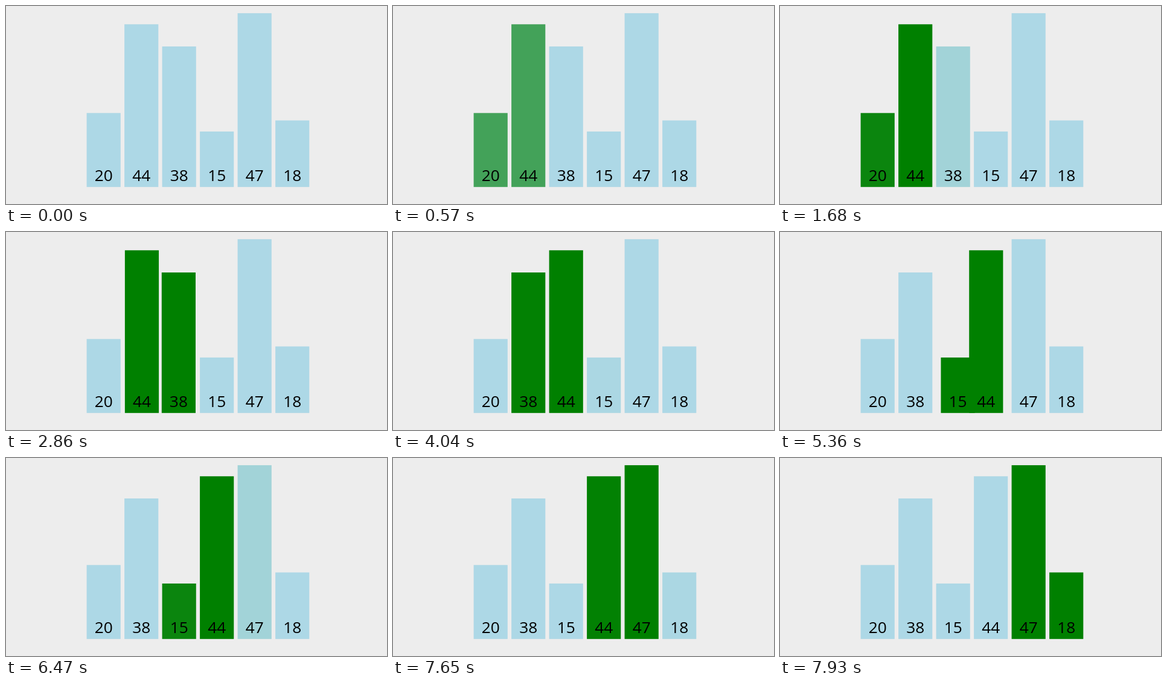
An HTML page for the animation above (8 s loop, 631 px wide and 328 px high).

```html
<!DOCTYPE html>
<html lang="en">
<head>
<meta charset="utf-8">
<title>Bubble sort</title>
<style>
  html, body { margin: 0; width: 100%; height: 100%; overflow: hidden; background: #ededed; }
  svg { display: block; width: 631px; height: 328px; }
  text { font: 26.3px "Open Sans", "Noto Sans", sans-serif; text-anchor: middle; }
</style>
</head>
<body>
<svg id="stage" viewBox="0 0 631 328"></svg>
<script>
const LOOP = 8000, TICK = 70, FADE = 250;
const LEFT = 133.6, PITCH = 62.5, WIDTH = 56.2, BASE = 299.8, UNIT = 6.125;
const BLUE = [173, 216, 230], GREEN = [0, 128, 0];
const values = [20, 44, 38, 15, 47, 18];

// at: first visible change; lead: time already eased by then;
// order: bar indices from left to right; lit: highlighted bars
const states = [
  { at: 0,    lead: FADE, order: '012345', lit: '' },
  { at: 500,  lead: 19, order: '012345', lit: '01' },
  { at: 1680, lead: 19, order: '012345', lit: '12' },
  { at: 2860, lead: 6,  order: '021345', lit: '12' },
  { at: 4040, lead: 6,  order: '021345', lit: '13' },
  { at: 5220, lead: 6,  order: '023145', lit: '13' },
  { at: 6470, lead: 19, order: '023145', lit: '14' },
  { at: 7650, lead: 6,  order: '023145', lit: '45' }
];

const stage = document.getElementById('stage');

function add(parent, tag, attrs) {
  const el = document.createElementNS('http://www.w3.org/2000/svg', tag);
  for (const key in attrs) el.setAttribute(key, attrs[key]);
  return parent.appendChild(el);
}

const bars = values.map(value => {
  const group = add(stage, 'g');
  const height = value * UNIT;
  const rect = add(group, 'rect', { y: BASE - height, width: WIDTH, height });
  add(group, 'text', { x: WIDTH / 2, y: 290 }).textContent = value;
  return { group, rect };
});

const mix = (a, b, k) => a + (b - a) * k;
const bezier = (p, a, b) => 3 * a * p * (1 - p) ** 2 + 3 * b * p * p * (1 - p) + p ** 3;

// The CSS "ease" curve
function ease(x) {
  if (x >= 1) return 1;
  let lo = 0, hi = 1;
  for (let i = 0; i < 24; i++) {
    const mid = (lo + hi) / 2;
    if (bezier(mid, 0.25, 0.25) < x) lo = mid; else hi = mid;
  }
  return bezier(lo, 0.1, 1);
}

function draw(time) {
  const n = states.filter(s => s.at <= time).length - 1;
  const to = states[n], from = states[Math.max(0, n - 1)];
  const elapsed = Math.floor((time - to.at) / TICK) * TICK + to.lead;
  const k = ease(elapsed / FADE);

  bars.forEach(({ group, rect }, i) => {
    const slot = mix(from.order.indexOf(i), to.order.indexOf(i), k);
    const glow = mix(+from.lit.includes(i), +to.lit.includes(i), k);
    group.setAttribute('transform', `translate(${LEFT + slot * PITCH} 0)`);
    rect.setAttribute('fill', `rgb(${BLUE.map((c, j) => Math.round(mix(c, GREEN[j], glow)))})`);
  });
}

function frame() {
  draw(performance.now() % LOOP);
  requestAnimationFrame(frame);
}
frame();
</script>
</body>
</html>
```
